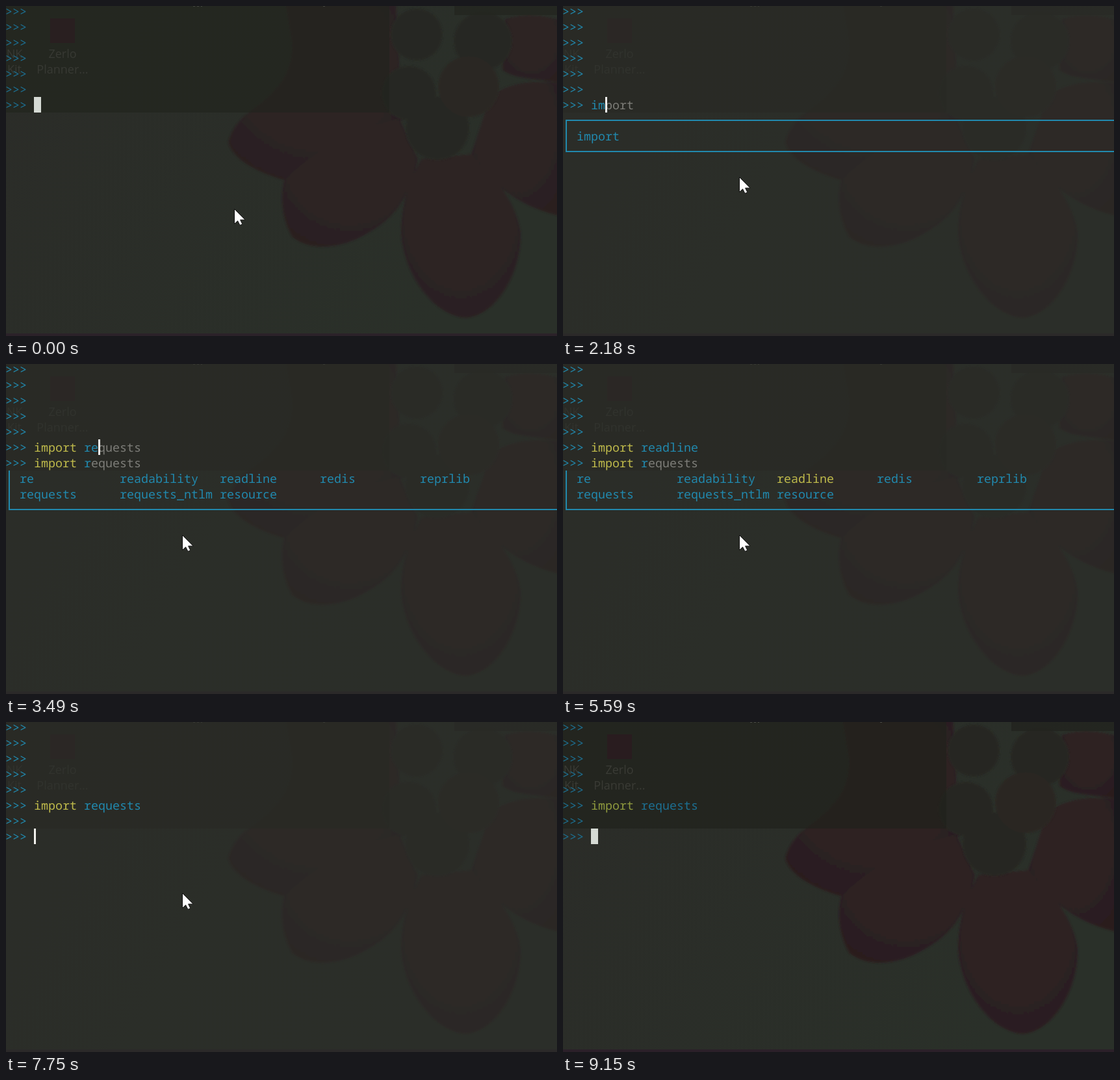
Recreate the animation shown at these times as an HTML page. Size 848 px wide and 508 px high, loop 9.38 s.

```html
<!DOCTYPE html>
<html lang="en">
<head>
<meta charset="utf-8">
<title>Terminal completion</title>
<style>
  html, body { margin: 0; width: 100%; height: 100%; overflow: hidden; background: #2c2d28; }
  svg { display: block; width: 848px; height: 508px; }
  #term text {
    font: 18.333px "Noto Sans Mono", "DejaVu Sans Mono", monospace;
    white-space: pre; text-rendering: geometricPrecision;
  }
  #desk text { font: 18px "Open Sans", "Noto Sans", sans-serif; fill: #3a3b35; text-anchor: middle; }
  #term { --blue: #2189ae; --yellow: #bfba4b; --grey: #7d7d78; --caret: #f2f2ee; }
  #term.away { --blue: #1d6f91; --yellow: #8f9a3e; --caret: #d5dad4; }
  .b { fill: var(--blue); }
  .y { fill: var(--yellow); }
  .g { fill: var(--grey); }
  .caret { fill: var(--caret); }
  .frame { fill: none; stroke: var(--blue); stroke-width: 2; }
</style>
</head>
<body>
<svg viewBox="0 0 848 508">
  <defs>
    <linearGradient id="ground" x2="1" y2=".35">
      <stop offset="0" stop-color="#2b2c28"/>
      <stop offset="1" stop-color="#2a3029"/>
    </linearGradient>
    <radialGradient id="petal" cx=".5" cy=".35" r=".7">
      <stop offset="0" stop-color="#2f2324"/>
      <stop offset="1" stop-color="#2b1e1f"/>
    </radialGradient>
    <filter id="soft"><feGaussianBlur stdDeviation="1.6"/></filter>
  </defs>
  <g id="desk">
    <rect width="848" height="508" fill="url(#ground)"/>
    <g filter="url(#soft)" fill="url(#petal)">
      <path d="M342 210C350 180 368 168 392 150C425 122 442 98 440 55L430 -5H600L610 175C560 225 490 245 428 268C388 256 350 238 342 210Z"/>
      <path d="M428 268C470 225 540 190 605 172L634 236C622 290 602 325 556 350C520 372 470 380 440 355C424 325 422 296 428 268Z"/>
      <path d="M640 235C618 270 608 310 608 350C612 415 660 478 708 480C755 476 794 410 792 348C784 300 752 262 718 228Z"/>
      <path d="M716 228C740 262 775 305 852 323V118C810 114 770 118 745 140Z"/>
      <path d="M768 20C800 10 830 15 852 22V118C815 112 780 112 764 98Z"/>
    </g>
    <g filter="url(#soft)" fill="#272722">
      <circle cx="632" cy="44" r="40"/>
      <circle cx="734" cy="54" r="45"/>
      <circle cx="620" cy="134" r="42"/>
      <circle cx="664" cy="188" r="49"/>
      <circle cx="712" cy="124" r="47" fill="#292823"/>
    </g>
    <path d="M0 0H590V164H0Z" fill="#1f211a" opacity=".62"/>
    <path d="M690 0H848V14H690Z" fill="#22231e" opacity=".8"/>
    <path d="M0 504H848V508H0Z" fill="#2b2029"/>
    <path d="M288 0h3m3 0h3m3 0h2M488 0h3" stroke="#4a4b45" stroke-width="2"/>
    <rect x="68" y="19" width="38" height="38" fill="#291c1f"/>
    <text x="87" y="80">Zerlo</text>
    <text x="87" y="104">Planner...</text>
    <text x="13" y="80">NK</text>
    <text x="13" y="104">Kit</text>
  </g>
  <rect id="veil" width="848" height="508" fill="#2d2e29"/>
  <g id="term"></g>
  <path id="mouse" d="M.5 .5V23.5L5.6 18.8L9 25.5L12.8 23.8L9.6 17.2H17Z" fill="#fff" stroke="#111" stroke-width="1"/>
</svg>
<script>
const LOOP = 9380;
const CELL = 11, LINE = 24;
const byId = id => document.getElementById(id);
const term = byId("term"), veil = byId("veil"), mouse = byId("mouse");

const iWords = "id if import in input int is isinstance issubclass iter".split(" ");
const rWords = "random re readability readline redis reprlib requests requests_ntlm resource rlcompleter".split(" ");
const reWords = rWords.slice(1, 9);

// A line of code: [keyword, name, suggestion]
const full = name => ["import ", name, ""];
const typed = n => ["import ", "requests".slice(0, n), "requests".slice(n)];
const chosen = name => ({ 5: full(name), 6: typed(1) });

// Each step changes part of the state; caret is [row, col] or null.
const steps = [
  [0, { away: true, veil: .15, last: 6, lines: {}, caret: [6, 4], words: null, pick: -1, high: false }],
  [70, { away: false, veil: .4 }],
  [150, { veil: .64 }],
  [690, { caret: null }],
  [990, { lines: { 6: ["", "i", "mport"] }, words: iWords, caret: [6, 5] }],
  [1080, { lines: { 6: ["", "im", "port"] }, words: ["import"], caret: null }],
  [1160, { caret: [6, 6] }],
  [1620, { caret: null }],
  [2180, { caret: [6, 6] }],
  [2470, { lines: { 6: full("") }, words: null, caret: [6, 10] }],
  [3020, { caret: null }],
  [3190, { lines: { 6: typed(0) }, caret: [6, 11] }],
  [3420, { lines: { 6: typed(1) }, words: rWords, caret: [6, 12] }],
  [3490, { lines: { 5: typed(2), 6: typed(1) }, words: reWords, high: true, caret: [5, 13] }],
  [4030, { pick: 0, caret: null }],
  [4510, { lines: chosen("readability"), caret: [5, 22] }],
  [4580, { pick: 1 }],
  [5040, { lines: chosen("readline"), pick: 2, caret: [5, 19] }],
  [5590, { caret: null }],
  [5870, { lines: chosen("redis"), pick: 3, caret: [5, 16] }],
  [6050, { lines: chosen("reprlib"), pick: 4, caret: [5, 18] }],
  [6510, { lines: chosen("requests"), pick: 5, caret: [5, 19] }],
  [6970, { caret: null }],
  [7200, { lines: { 5: full("requests") }, words: null, pick: -1, caret: [6, 4] }],
  [7750, { last: 7, caret: [7, 4] }],
  [8280, { caret: null }],
  [8810, { caret: [7, 4] }],
  [9150, { away: true, veil: 0 }]
];

const colX = col => col * CELL - 1;
const rowY = row => row * LINE - 4;
const label = (row, col, str, cls) =>
  str ? `<text class="${cls}" x="${colX(col)}" y="${rowY(row) + 19}">${str}</text>` : "";

function codeLine(row, parts) {
  let col = 4;
  return parts.map((str, i) => {
    const out = label(row, col, str, "ybg"[i]);
    col += str.length;
    return out;
  }).join("");
}

function popup({ words, pick, high }) {
  const first = high ? 7 : 8;
  const bottom = rowY(first + Math.ceil(words.length / 5)) + 12;
  const edge = high ? `M5 164V${bottom}H860` : `M860 176H5V${bottom}H860`;
  return `<path class="frame" d="${edge}"/>` + words.map((word, i) =>
    label(first + Math.floor(i / 5), 2 + i % 5 * 14, word, i === pick ? "y" : "b")).join("");
}

function drawTerm(s) {
  let out = "";
  for (let row = 0; row <= s.last; row++) {
    out += label(row, 0, "&gt;&gt;&gt;", "b");
    if (s.lines[row]) out += codeLine(row, s.lines[row]);
  }
  if (s.words) out += popup(s);
  if (s.caret) {
    const [row, col] = s.caret;
    out += `<rect class="caret" x="${colX(col)}" y="${rowY(row)}" width="${s.away ? 11 : 3}" height="24"/>`;
  }
  term.innerHTML = out;
  term.setAttribute("class", s.away ? "away" : "");
  veil.setAttribute("opacity", s.veil);
}

// The pointer rests, then leaves through the bottom edge in short hops.
function mouseAt(t) {
  if (t < 150) return [351, 312];
  if (t < 460 || t >= 8860) return null;
  if (t < 8070) return [271, 263];
  const k = (Math.floor((t - 8070) / 79) + 1) / 10;
  return [Math.round(271 + 457 * k), Math.round(263 + 235 * k * k)];
}

let shown = -1;
function render(t) {
  const count = steps.filter(([at]) => at <= t).length;
  if (count !== shown) {
    shown = count;
    drawTerm(Object.assign({}, ...steps.slice(0, count).map(step => step[1])));
  }
  const spot = mouseAt(t);
  mouse.style.display = spot ? "" : "none";
  if (spot) mouse.setAttribute("transform", `translate(${spot})`);
}

const begin = performance.now();
function tick() {
  render((performance.now() - begin) % LOOP);
  requestAnimationFrame(tick);
}
tick();
</script>
</body>
</html>
```
